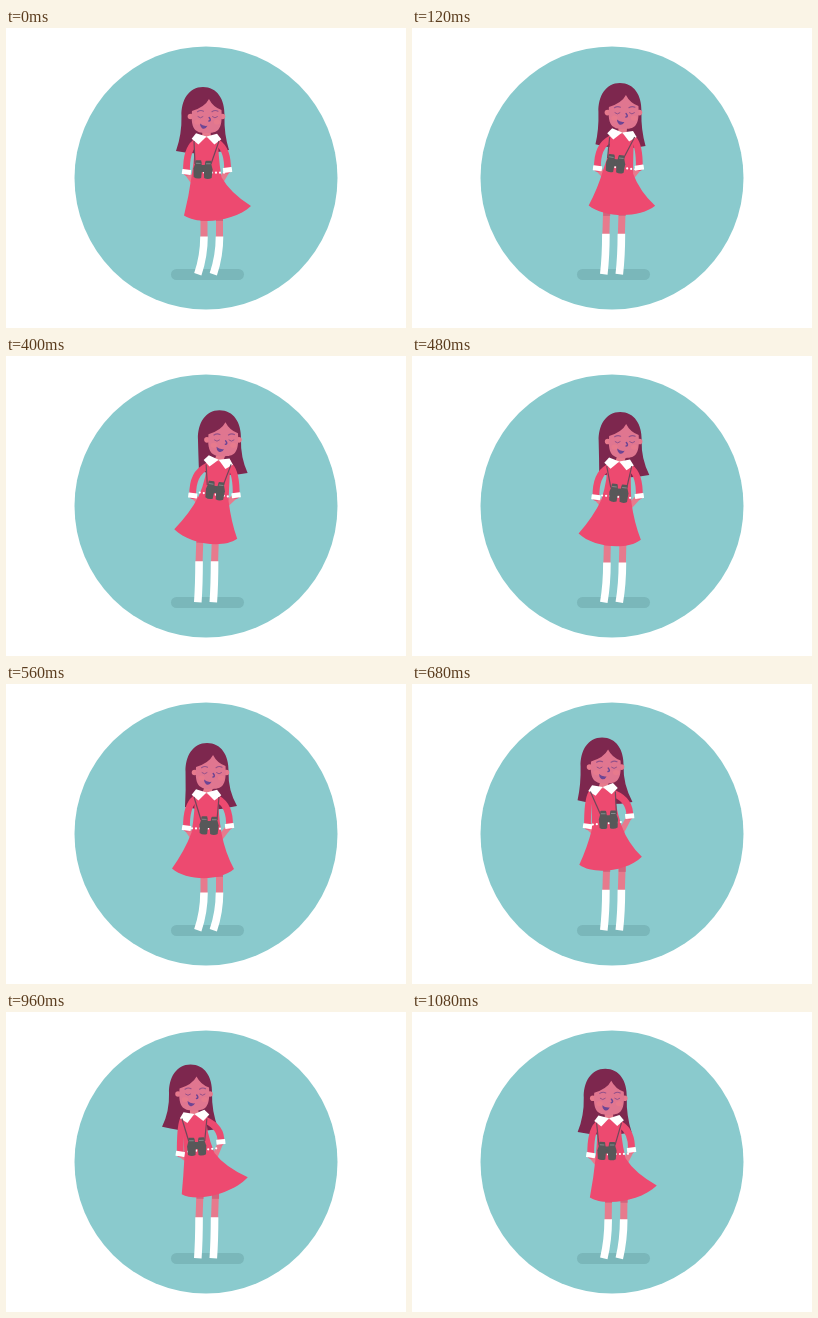
An HTML page with a canvas that plays this animation: 400 by 300 pixels, repeating every 1.12 s.

```html
<!DOCTYPE html>
<html lang="en">
<head>
<meta charset="utf-8">
<title>Swaying girl</title>
<style>
html, body { margin: 0; width: 100%; height: 100%; overflow: hidden; background: #fff; }
canvas { display: block; width: 400px; height: 300px; }
</style>
</head>
<body>
<canvas id="stage" width="400" height="300"></canvas>
<script>
const g = document.getElementById('stage').getContext('2d');
const LOOP = 1120, STEP = 40;
const C = {
  sky: '#8acacd', ground: '#7ab7ba', hair: '#7d274e', dress: '#ed4a70',
  skin: '#e77a8d', shade: '#d2637c', face: '#e07690', ink: '#6c4594',
  line: '#93518a', gear: '#575859', light: '#85898b', strap: '#71475a'
};

const add = (p, x, y) => [p[0] + x, p[1] + y];
const mix = (a, b, u, v = u) => [a[0] + (b[0] - a[0]) * u, a[1] + (b[1] - a[1]) * v];

// One sideways sway and two hops per loop; loose parts trail by a cosine share
function pose(t) {
  const a = 2 * Math.PI * t / LOOP;
  const sway = Math.sin(a), trail = Math.cos(a), hop = Math.abs(sway) ** .8;
  const topY = 59 - 6.8 * hop + 1.2 * sway;
  const neck = [200.5 + 15.5 * sway, topY + 50];
  const waist = [200 + 9 * sway, 149 - 7.5 * hop];
  return {
    trail, neck, waist,
    bend: 1 - hop,
    lean: neck[0] - waist[0],
    top: [199 + 17 * Math.sin(a - .12), topY],
    hairL: [174.5 + 20 * sway - 4.5 * trail, 123 - 10 * hop],
    hairR: [227 + 15.5 * sway - 4 * trail, 122 - 6 * hop],
    cuffL: [180.5 + 8 * sway, 144 - 4 * hop - 1.5 * sway],
    cuffR: [222.5 + 9 * sway - trail, 142 - 9 * hop + 6 * sway],
    hemL: [172 + 6 * trail, 186 - 10 * hop - 4.5 * sway + 1.5 * trail],
    hemR: [236.5 + 8.5 * trail, 181.5 - 9 * hop + 8.4 * sway - 3.5 * trail],
    gear: [200 + 9.5 * sway - 3 * trail, 142 - 8.5 * hop]
  };
}

// Each leg of a path is 1, 2 or 3 points: line, quadratic, cubic
function trace(start, legs) {
  g.beginPath();
  g.moveTo(...start);
  for (const leg of legs) {
    const kind = ['lineTo', 'quadraticCurveTo', 'bezierCurveTo'][leg.length - 1];
    g[kind](...leg.flat());
  }
}
function fill(color, start, ...legs) {
  trace(start, legs);
  g.fillStyle = color;
  g.fill();
}
function line(color, width, start, ...legs) {
  trace(start, legs);
  g.strokeStyle = color;
  g.lineWidth = width;
  g.stroke();
}
function oval(color, x, y, rx, ry = rx) {
  g.beginPath();
  g.ellipse(x, y, rx, ry, 0, 0, 7);
  g.fillStyle = color;
  g.fill();
}
function box(color, x, y, w, h, r) {
  g.beginPath();
  g.roundRect(x, y, w, h, r);
  g.fillStyle = color;
  g.fill();
}
function at(p, angle, draw) {
  g.save();
  g.translate(...p);
  g.rotate(angle);
  draw();
  g.restore();
}

function backdrop() {
  g.fillStyle = '#fff';
  g.fillRect(0, 0, 400, 300);
  oval(C.sky, 200, 150, 131.5);
  box(C.ground, 165, 241, 73, 11, 5.5);
}

function backHair({ top, hairL, hairR }) {
  const left = add(top, -21.5, 29), right = add(top, 21.5, 29);
  fill(C.hair, top,
    [add(top, -14, 0), add(top, -22, 13), left],
    [add(top, -21, 47), hairL],
    [add(mix(hairL, hairR, .5), 0, 6), hairR],
    [add(top, 21, 47), right],
    [add(top, 22, 12), add(top, 14, 0), top]);
}

function legs({ waist, bend }) {
  for (const x of [192, 207.5]) {
    const knee = [x + 6 * bend, 204.5 + 4 * bend];
    const hip = [knee[0] + 1.2 * (1 - bend), waist[1] + 33];
    line(C.skin, 7, hip, [add(knee, 0, 1)]);
    line(C.shade, 7, hip, [add(hip, 0, 11)]);
    line('#fff', 7.6, knee, [[knee[0], 228], [x - .2, 246.3]]);
  }
}

function dress({ neck, waist, hemL, hemR, cuffL, cuffR, lean, trail }) {
  g.lineCap = 'round';
  line(C.skin, 5.5, cuffL, [add(waist, -14, 3)]);
  line(C.skin, 5.5, cuffR, [add(waist, 15, 4)]);
  g.lineCap = 'butt';
  const a = add(waist, -14.5, -lean * .4), b = add(waist, 15.5, lean * .4);
  fill(C.dress, add(neck, -12, 0),
    [add(neck, -11, 16), a],
    [mix(a, hemL, .35, .5), hemL],
    [add(mix(hemL, hemR, .22), 0, 12), add(mix(hemL, hemR, .76), 0, 13), hemR],
    [mix(b, hemR, .3, .55), b],
    [add(neck, 11, 16), add(neck, 12, 0)]);
  for (let i = -3; i <= 4; i++) {
    const x = 4 * i + 2 * trail;
    oval('#fff', waist[0] + x, waist[1] - 4.5 + lean * .025 * x, 1.1);
  }
}

function arm(neck, cuff, side) {
  const s = add(neck, side * 11.5, 6);
  const bend = [s[0] + (cuff[0] - s[0]) * 1.05, s[1] + 7];
  g.lineCap = 'round';
  line(C.dress, 6.8, s, [bend, cuff]);
  g.lineCap = 'butt';
  const tilt = Math.atan2(bend[0] - cuff[0], cuff[1] - bend[1]) - side * .15;
  at(cuff, tilt, () => box('#fff', -4.5, -2.5, 9, 5, .5));
}

function collar({ neck, top, lean }) {
  line(C.skin, 8.5, add(top, 3.5, 39), [add(neck, 0, 1)]);
  at(neck, lean * .028, () => {
    for (const s of [-1, 1])
      fill('#fff', [0, -.5], [[s * 10.5, -3.5]], [[s * 14.8, 2]], [[s * 8, 7.5]]);
  });
}

function binoculars({ neck, gear, lean }) {
  for (const s of [-1, 1])
    line(C.strap, 1.2, add(neck, s * 12.5, 4), [add(gear, s * 8, -6)]);
  at(gear, .04 + lean * .018, () => {
    box(C.gear, -3, -5, 6, 7, 1);
    for (const s of [-1, 1]) {
      fill(C.gear, [s * 2, -8], [[s * 7.5, -8]], [[s * 9.6, -1]],
        [[s * 9, 7.5]], [[s * 5.5, 9.8], [s * 1.5, 8]], [[s * .8, -1]]);
      box(C.gear, s * 5 - 3, -9.5, 6, 3, 1);
      line(C.light, 1, [s * 5 - 2.3, -6.5], [[s * 5 + 2.3, -6.5]]);
    }
  });
}

function face({ top }) {
  at(add(top, 3, 0), 0, () => {
    for (const x of [-15.5, 16.5]) oval(C.skin, x, 29.5, 2.8);
    fill(C.face, [3, 12],
      [[-1, 20], [-14, 24]],
      [[-16, 45], [-8, 46], [1, 46]],
      [[11, 46], [17, 44], [15.5, 23]],
      [[7, 20], [3, 12]]);
    for (const x of [-8.5, 11]) oval(C.skin, x, 35, 3.2, 2.6);
    g.lineCap = 'round';
    for (const x of [-5.5, 9]) {
      line(C.line, 1.1, [x - 3, 24.7], [[x, 22.7], [x + 3, 24.2]]);
      line(C.line, 1, [x - 2.5, 29.7], [[x, 32.2], [x + 2.5, 29.7]]);
    }
    line(C.ink, 1.5, [3.2, 30.5], [[5.5, 33.5], [3, 34]]);
    g.lineCap = 'butt';
    fill(C.ink, [-6, 36.5], [[-3, 39.5], [1.5, 38.8]],
      [[-.5, 43], [-4, 41.2]], [[-6, 40], [-6, 36.5]]);
  });
}

function render(t) {
  const p = pose(t);
  backdrop();
  backHair(p);
  legs(p);
  dress(p);
  arm(p.neck, p.cuffL, -1);
  arm(p.neck, p.cuffR, 1);
  collar(p);
  binoculars(p);
  face(p);
}

const start = performance.now();
function tick() {
  const t = Math.max(0, performance.now() - start) % LOOP;
  render(Math.floor(t / STEP) * STEP);
  requestAnimationFrame(tick);
}
tick();
</script>
</body>
</html>
```
